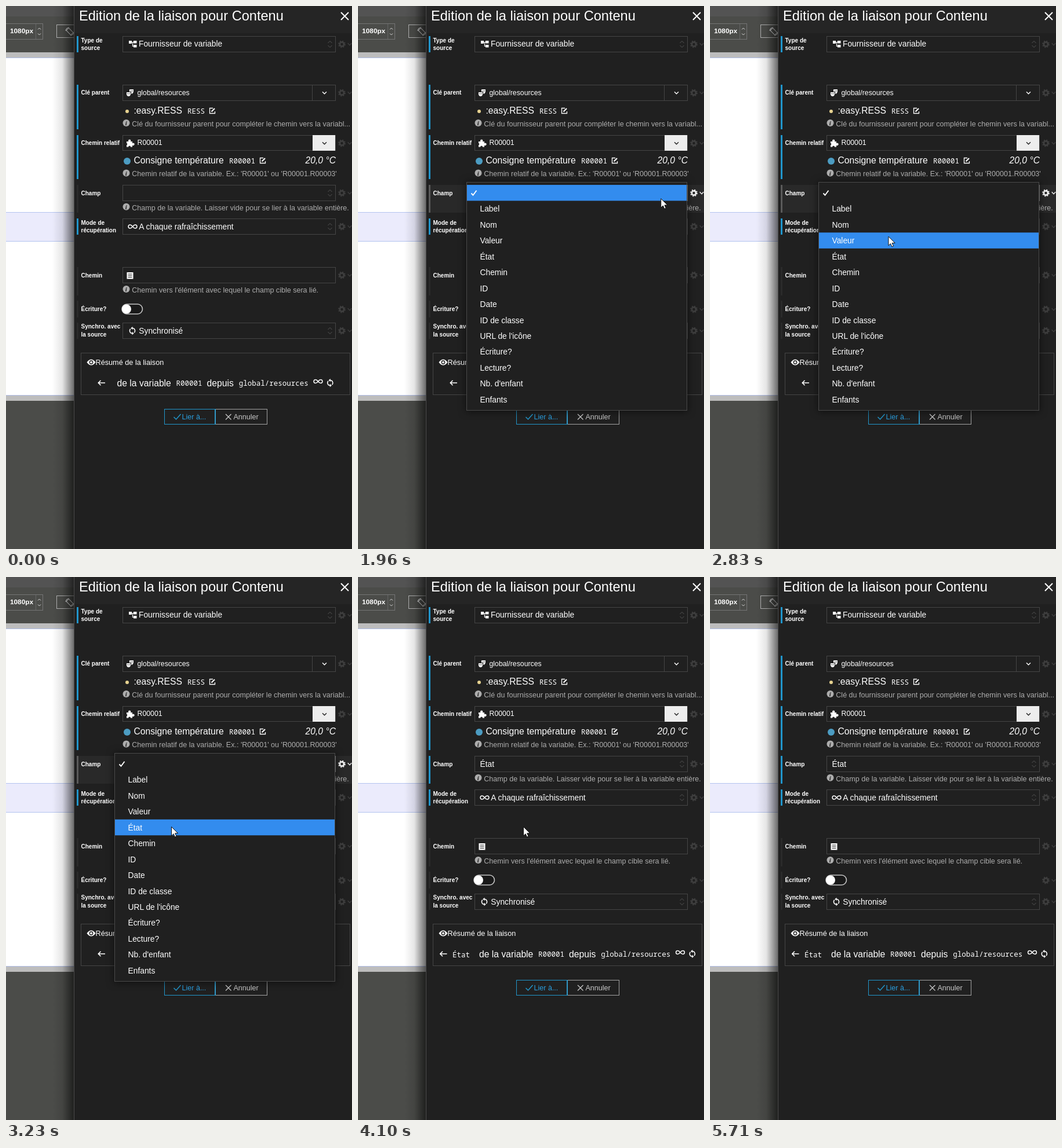
An HTML page that plays this animation: 597 by 938 pixels, repeating every 6490 ms.

```html
<!DOCTYPE html>
<html lang="fr">
<head>
<meta charset="utf-8">
<title>Edition de la liaison</title>
<style>
html, body { margin: 0; width: 100%; height: 100%; overflow: hidden; background: #202020; }
svg { display: block; width: 597px; height: 938px; font-family: "Liberation Sans", Arial, sans-serif; }
text { white-space: pre; }
.mono { font-family: "Noto Sans Mono", "DejaVu Sans Mono", monospace; }
.line { fill: none; }
#menu { filter: drop-shadow(0 1px 7px rgba(0, 0, 0, .6)); }
</style>
</head>
<body>
<svg id="stage" viewBox="0 0 597 938" xmlns="http://www.w3.org/2000/svg"></svg>
<script>
const BLUE = '#2196cb', WHITE = '#fff', DIM = '#3e3e3e', HELP = '#adadad', PANEL = '#202020';
const LOOP = 6490, ITEM_TOP = 309, ITEM_H = 27.45;

// Drawing helpers: each returns markup
const rect = (x, y, w, h, fill, more = '') =>
  `<rect x="${x}" y="${y}" width="${w}" height="${h}" fill="${fill}" ${more}/>`;
const box = (x, y, w, h, stroke = '#454545', more = '') =>
  rect(x + .5, y + .5, w - 1, h - 1, 'none', `stroke="${stroke}" ${more}`);
const text = (x, mid, str, size = 13.8, fill = WHITE, more = '') =>
  `<text x="${x}" y="${mid + size * .36}" font-size="${size}" fill="${fill}" ${more}>${str}</text>`;
const code = (x, mid, str) => text(x, mid, str, 12.5, WHITE, 'class="mono"');
const line = (d, stroke = WHITE, width = 1.3, more = '') =>
  `<path class="line" d="${d}" stroke="${stroke}" stroke-width="${width}" ${more}/>`;
const shape = (d, fill = WHITE) => `<path d="${d}" fill="${fill}" fill-rule="evenodd"/>`;
const dot = (x, y, r, fill, more = '') => `<circle cx="${x}" cy="${y}" r="${r}" fill="${fill}" ${more}/>`;
const at = (x, y, body, more = '') => `<g transform="translate(${x} ${y})" ${more}>${body}</g>`;

const down = (x, y, color, w = 3.5, width = 1.4) =>
  line(`M${x - w} ${y - w / 2}l${w} ${w}l${w} ${-w}`, color, width);
const updown = (x, y, color = '#555', w = 3.5, gap = 2) =>
  line(`M${x - w} ${y - gap}l${w} ${-w}l${w} ${w}M${x - w} ${y + gap}l${w} ${w}l${w} ${-w}`, color, 1);
const info = y => dot(207.5, y, 6, HELP) +
  `<text x="207.3" y="${y + 4}" font-size="11" font-family="Liberation Serif, serif" font-weight="bold" font-style="italic" text-anchor="middle" fill="${PANEL}">i</text>`;
const help = (y, str) => info(y - 1) + text(217.3, y + .3, str, 12.55, HELP);
const edit = (x, y) => at(x, y, line('M1 -4.5H-4.5V4.5H4.5V1') + line('M-1.5 1.5L4 -4', WHITE, 2.2));
const loop8 = (x, y) => at(x, y,
  line('M0 0C-2 -2.6 -3.2 -3 -4.4 -3A3 3 0 0 0 -4.4 3C-3.2 3 -2 2.6 0 0C2 -2.6 3.2 -3 4.4 -3A3 3 0 0 1 4.4 3C3.2 3 2 2.6 0 0Z', WHITE, 1.5));
const sync = (x, y) => at(x, y,
  line('M0 -4.5A4.5 4.5 0 0 1 3.2 3.2M0 4.5A4.5 4.5 0 0 1 -3.2 -3.2', WHITE, 1.5) +
  shape('M.5 -7.3V-1.7L-2.7 -4.5ZM-.5 7.3V1.7L2.7 4.5Z'));
const gear = y => at(579.5, y,
  dot(0, 0, 3.6, 'none', 'stroke="currentColor" stroke-width="2.8"') +
  dot(0, 0, 5.4, 'none', 'stroke="currentColor" stroke-width="2" stroke-dasharray="2.12 2.12"')) +
  down(593, y, 'currentColor', 3.3);

// top, height, gear y, active, label lines as [y, text]
const rows = [
  [52, 28, 66, 1, [59, 'Type de'], [72, 'source']],
  [136, 77, 150, 1, [149.5, 'Clé parent']],
  [223, 76, 237, 1, [236, 'Chemin relatif']],
  [309, 48, 323, 0, [323, 'Champ']],
  [367, 28, 381, 1, [374, 'Mode de'], [387, 'récupération']],
  [451, 49, 465, 0, [465, 'Chemin']],
  [509, 29, 524, 0, [523, 'Écriture?']],
  [547, 28, 561, 0, [553.5, 'Synchro. avec'], [567, 'la source']]
];
const CHAMP = 3;
const items = ['', 'Label', 'Nom', 'Valeur', 'État', 'Chemin', 'ID', 'Date', 'ID de classe',
  "URL de l'icône", 'Écriture?', 'Lecture?', "Nb. d'enfant", 'Enfants'];

const backdrop =
  rect(0, 0, 118, 938, '#4b4c49') + rect(0, 0, 118, 18, '#535353') +
  box(-2, 30, 66, 28, '#757575') + rect(51, 31, 1, 26, '#666') +
  text(7, 43, '1080px', 11.8, WHITE, 'font-weight="bold"') + updown(57.5, 44, '#ddd', 2.5, 3.5) +
  box(87, 32, 40, 23, '#b5b5b5') +
  at(110, 44, box(-3.5, -6, 7, 12, '#ddd', 'rx="1" transform="rotate(-45)"') +
    line('M-7 -1A7 7 0 0 1 -1 -7M7 1A7 7 0 0 1 1 7', '#ddd', 1.2)) +
  rect(0, 80, 118, 602, '#bdbdbd') + rect(0, 89, 118, 583, WHITE) +
  rect(0, 89, 118, 1, '#aebbe6') + rect(0, 672, 118, 1, '#aebbe6') +
  rect(0, 356, 118, 51, '#ebebfc') + rect(0, 356, 118, 1, '#b3c3ef') + rect(0, 406, 118, 1, '#b3c3ef') +
  rect(80, 0, 38, 938, 'url(#shade)');

const rowMarkup = rows.map(([y, h, gy, on, ...labels], i) =>
  `<g id="row${i}">` + rect(122, y, 475, h, '#292929', 'class="bg"') +
  rect(122, y, 3, h, on ? BLUE : '#2a2a2a', 'class="mark"') +
  labels.map(([ly, s]) => text(129.5, ly, s, 10, WHITE, 'font-weight="bold"')).join('') +
  `<g class="gear" color="${DIM}">${gear(gy)}</g></g>`).join('');

const select = y => box(201, y, 368, 28) + updown(559, y + 14);

const fields =
  select(52) + rect(212, 60, 5, 5, WHITE) + rect(220, 60, 5.5, 4.5, WHITE) + rect(220, 67, 5.5, 4.5, WHITE) +
  line('M216 62.5H221M218.5 62.5V69.5H221', WHITE, 1.2) + text(229, 65.3, 'Fournisseur de variable') +

  box(201, 136, 368, 28) + rect(528, 136, 1, 28, '#454545') + down(549.5, 150, WHITE) +
  at(214, 150, shape('M-6 -1H1V3Q0 6 -2.5 6Q-5 6 -6 3ZM-4.5 1V2.2H-3V1ZM-1.8 1V2.2H-.3V1ZM-1 -6H6V-2Q5 1.6 2.2 2V-2H-1ZM.8 -4V-2.8H2.2V-4ZM3.4 -4V-2.8H4.8V-4Z')) +
  text(226.5, 149.8, 'global/resources', 12.3) +
  dot(209, 182, 3, '#e6d290') + text(220.5, 180.5, ':easy.RESS', 15.7) + code(313, 181, 'RESS') + edit(356, 181) +
  help(203, 'Clé du fournisseur parent pour compléter le chemin vers la variabl...') +

  box(201, 223, 368, 27) + rect(529, 223, 39, 27, '#ededed') + down(549.5, 237, '#222') +
  at(214, 237, shape('M-6 -3H-2.6A2.2 2.2 0 1 1 1 -3H4V.2A2.2 2.2 0 1 1 4 3.4V6.5H1A1.9 1.9 0 0 0 -2.8 6.5H-6V3.4A1.9 1.9 0 0 0 -6 -.2Z')) +
  text(226.5, 236, 'R00001', 12.3) +
  dot(209, 268, 6, '#4c9cc2') + text(220.5, 266.5, 'Consigne température', 15.7) + code(385, 267, 'R00001') +
  edit(443, 267) + text(516.5, 266.3, '20,0 °C', 15.7, WHITE, 'font-style="italic"') +
  help(289.5, "Chemin relatif de la variable. Ex.: 'R00001' ou 'R00001.R00003'") +

  `<g id="champ">${select(309)}</g>` + `<g id="value">${text(210.5, 323, 'État')}</g>` +
  help(347.7, 'Champ de la variable. Laisser vide pour se lier à la variable entière.') +

  select(367) + loop8(218.5, 381) + text(229.3, 380.7, 'A chaque rafraîchissement') +

  box(201, 451, 368, 28) +
  shape('M208.5 460H219.5V471.5H208.5ZM210.5 462.5V463.6H217.5V462.5ZM210.5 465.2V466.3H217.5V465.2ZM210.5 468V469.1H217.5V468Z') +
  help(490, "Chemin vers l'élément avec lequel le champ cible sera lié.") +

  rect(200, 515, 35.5, 17, '#191919', 'rx="8.5" stroke="#c4c4c4" stroke-width="1.6"') + dot(208, 523.5, 8, WHITE) +

  select(547) + sync(218, 561) + text(229.3, 560.7, 'Synchronisé');

const summary =
  box(129, 599, 465, 73) +
  at(147, 615.5, shape('M-7.5 0Q-4 -5 0 -5Q4 -5 7.5 0Q4 5 0 5Q-4 5 -7.5 0ZM0 -3.4A3.4 3.4 0 1 0 0 3.4A3.4 3.4 0 1 0 0 -3.4Z') + dot(0, 0, 2, WHITE)) +
  text(154.5, 615, 'Résumé de la liaison', 12.7) +
  `<g id="arrow">${line('M171 651H159.5M163.5 646.8L159.3 651L163.5 655.2', WHITE, 1.6)}</g>` +
  `<g id="part">${code(163, 652, 'État')}</g>` +
  `<g id="phrase">` + text(191.5, 651, 'de la variable', 15.7) + code(293.5, 651.7, 'R00001') +
  text(346.5, 651, 'depuis', 15.7) + code(401.7, 651.7, 'global/resources') + loop8(538.5, 648.5) + sync(559.3, 651) + '</g>';

const buttons =
  box(361, 696, 90, 27, '#a3a3a3') + box(273, 696, 88.5, 27, BLUE) + rect(360, 696, 1.5, 27, BLUE) +
  line('M289.5 710L293.5 714L301.5 705', BLUE, 1.5) + text(303.5, 709.3, 'Lier à...', 12.55, '#2a9fe0') +
  line('M379 705L388.5 714.5M388.5 705L379 714.5', '#c8c8c8', 1.3) + text(392.5, 709.3, 'Annuler', 12.55, '#c8c8c8');

const menu = '<g id="menu">' +
  rect(187.5, 304.5, 380, 394, PANEL, 'stroke="#4a4a4a"') +
  rect(188, ITEM_TOP, 379, ITEM_H, '#338cee', 'id="pick"') +
  line('M195.5 323.5L198.5 326.8L204.5 318.8', WHITE, 1.9) +
  items.map((s, i) => text(210.5, 323 + i * ITEM_H, s)).join('') + '</g>';

document.getElementById('stage').innerHTML =
  `<defs><linearGradient id="shade"><stop offset="0" stop-color="#000" stop-opacity="0"/>
  <stop offset=".45" stop-color="#000" stop-opacity=".1"/><stop offset="1" stop-color="#000" stop-opacity=".6"/></linearGradient></defs>` +
  backdrop + rect(117, 0, 480, 938, PANEL) + rect(118, 0, 479, 47, '#252525') + rect(117, 0, 1, 938, '#4c4c4c') +
  text(126, 17, 'Edition de la liaison pour Contenu', 23.6) +
  line('M578 11L591 24M591 11L578 24', WHITE, 2) +
  rowMarkup + fields + summary + buttons + menu +
  '<path id="cursor" d="M0 0V15.5L3.6 12.2L6 17.6L8.6 16.5L6.2 11.2H11.2Z" fill="#fff" stroke="#111" stroke-width="1"/>';

// Bursts of motion: start, end, number of steps
const bursts = [[720, 1310, 10], [1370, 1960, 8], [2290, 2890, 10], [2960, 3230, 5], [3620, 4100, 7], [5290, 5710, 7]];
// Pointer path: time, x, y, easing power (1 = linear)
const path = [
  [720, 591, 783, 1], [1244, 494, 430, 1.7], [1310, 497, 404, 1], [1370, 504, 379, 1], [1623, 523.5, 332.5, 1.6],
  [2290, 522, 333, 1], [2556, 372, 343, 1.2], [2890, 292, 412, 1], [3230, 285.5, 431.5, 1.2],
  [5220, 285.5, 431.5, 1], [5710, 240, 945, .6]
];

const clamp = v => Math.max(0, Math.min(1, v));
const $ = id => document.getElementById(id);

function held(t) {
  let last = 0;
  for (const [a, b, n] of bursts) {
    if (t < a) break;
    const d = (b - a) / (n - 1);
    last = Math.min(b, a + Math.floor((t - a) / d + 1e-6) * d);
  }
  return last;
}

function pointer(t) {
  const i = path.findIndex(k => k[0] > t);
  if (i < 1) return path[i < 0 ? path.length - 1 : 0].slice(1, 3);
  const [t0, x0, y0] = path[i - 1], [t1, x1, y1, pow] = path[i];
  const u = 1 - (1 - (t - t0) / (t1 - t0)) ** pow;
  return [x0 + (x1 - x0) * u, y0 + (y1 - y0) * u];
}

function show(el, on) { el.style.opacity = on ? 1 : 0; }

function draw(t) {
  const s = held(t), [x, y] = pointer(s);
  const visible = s >= 720 && s < 5709;
  const open = s > 1750 && s < 3690, chosen = s >= 3690, summed = s >= 3930;

  show($('cursor'), visible);
  $('cursor').setAttribute('transform', `translate(${x} ${y})`);

  const fade = s < 2500 ? clamp((s - 1720) / 235) : clamp((3860 - s) / 320);
  $('menu').style.opacity = fade;
  const index = Math.max(0, Math.min(13, Math.floor((y - ITEM_TOP) / ITEM_H)));
  $('pick').setAttribute('y', ITEM_TOP + index * ITEM_H);

  rows.forEach(([top, h, , active], i) => {
    const row = $('row' + i);
    const over = open ? i === CHAMP : visible && y >= top && y < top + h;
    const on = active || (i === CHAMP && chosen);
    show(row.querySelector('.bg'), over);
    row.querySelector('.mark').setAttribute('fill', on ? BLUE : over ? '#5a5a5a' : '#2a2a2a');
    row.querySelector('.gear').setAttribute('color', over ? '#f0f0f0' : DIM);
    if (i === CHAMP) $('champ').querySelector('rect').setAttribute('stroke', over ? '#8a8a8a' : '#454545');
  });

  show($('value'), chosen);
  show($('part'), summed);
  $('arrow').setAttribute('transform', `translate(${summed ? -17.5 : 0} 0)`);
  $('phrase').setAttribute('transform', `translate(${summed ? 17.5 : 0} 0)`);
}

const start = performance.now();
function tick() {
  draw((performance.now() - start) % LOOP);
  requestAnimationFrame(tick);
}
tick();
</script>
</body>
</html>
```
